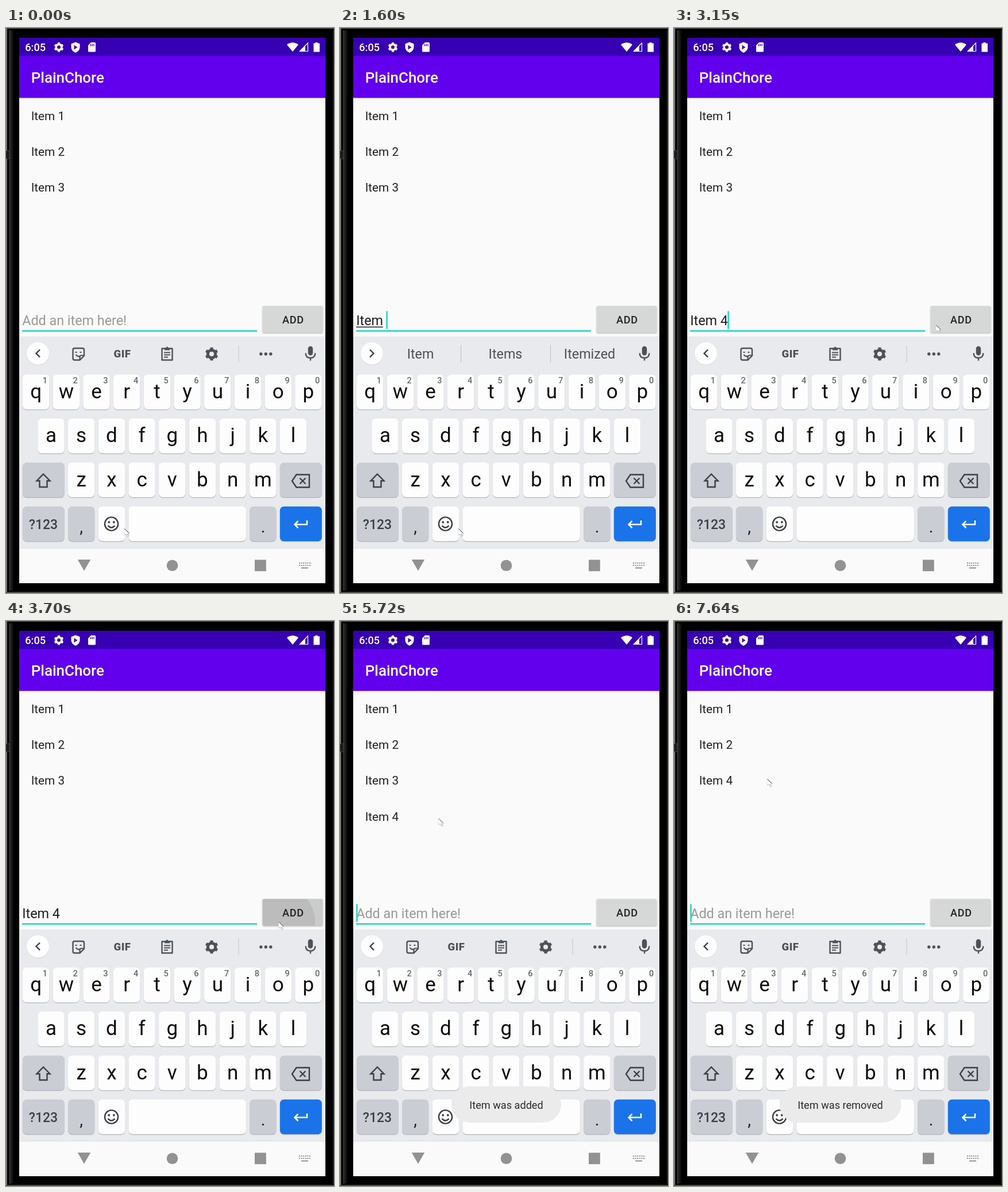
An HTML page that plays this animation: 571x981 px, repeating every 8000 ms.

```html
<!DOCTYPE html>
<html lang="en">
<head>
<meta charset="utf-8">
<title>To-do list</title>
<style>
html, body { margin: 0; width: 100%; height: 100%; overflow: hidden; background: #000; }
svg { display: block; width: 100vw; height: 100vh; font-family: Roboto, "Noto Sans", sans-serif; }
text { white-space: pre; }
.mid { text-anchor: middle; }
.line { fill: none; stroke: #3c4043; stroke-width: 2.4; }
.list { font-size: 20.74px; fill: #212121; }
.field { font-size: 23.33px; fill: #1f1f1f; }
.word { font-size: 23.3px; fill: #4d5055; text-anchor: middle; }
.key { font-size: 35px; fill: #0c0c0d; text-anchor: middle; }
.digit { font-size: 14.5px; font-weight: 500; fill: #63666b; text-anchor: middle; }
.toast { font-size: 18.15px; fill: #2b2b2b; text-anchor: middle; }

/* Hard switches on an 8 s loop */
.step { animation: 8s step-end infinite; }
#hint { animation-name: hint; }
#c1 { animation-name: c1; }
#c2 { animation-name: c2; }
#c3 { animation-name: c3; }
#c4 { animation-name: c4; }
#c5 { animation-name: c5; }
#compose { animation-name: compose; }
#caret { animation-name: caret; }
#tools { animation-name: tools; }
#words { animation-name: words; }
#w1 { animation-name: w1; }
#w2 { animation-name: w2; }
#w3 { animation-name: w3; }
#third { animation-name: third; }
#moved { animation-name: moved; }
#fourth { animation-name: fourth; }

@keyframes hint { 0% { opacity: 1 } 3.75% { opacity: 0 } 47.875%, 100% { opacity: 1 } }
@keyframes c1 { 0% { fill-opacity: 0 } 3.75% { fill-opacity: 1 } 47.875%, 100% { fill-opacity: 0 } }
@keyframes c2 { 0% { fill-opacity: 0 } 7.75% { fill-opacity: 1 } 47.875%, 100% { fill-opacity: 0 } }
@keyframes c3 { 0% { fill-opacity: 0 } 13.4% { fill-opacity: 1 } 47.875%, 100% { fill-opacity: 0 } }
@keyframes c4 { 0% { fill-opacity: 0 } 15.6% { fill-opacity: 1 } 47.875%, 100% { fill-opacity: 0 } }
@keyframes c5 { 0% { fill-opacity: 0 } 23.8% { fill-opacity: 1 } 47.875%, 100% { fill-opacity: 0 } }
@keyframes compose {
  0% { width: 0 } 3.75% { width: 6.4px } 7.75% { width: 14px } 13.4% { width: 26.3px }
  15.6% { width: 46.7px } 23.8%, 100% { width: 0 }
}
@keyframes caret {
  0% { opacity: 0; transform: none }
  1.6% { opacity: 1; transform: none }
  3.75% { opacity: 1; transform: translateX(6.4px) }
  7.75% { opacity: 1; transform: translateX(14px) }
  13.4% { opacity: 1; transform: translateX(26.3px) }
  15.6% { opacity: 1; transform: translateX(46.7px) }
  19.9% { opacity: 1; transform: translateX(52.2px) }
  23.8% { opacity: 1; transform: translateX(65.1px) }
  29.1% { opacity: 0; transform: translateX(65.1px) }
  35.2% { opacity: 1; transform: translateX(65.1px) }
  41.2% { opacity: 0; transform: none }
  47.875% { opacity: 1; transform: none }
  53.7% { opacity: 0; transform: none }
  57.9% { opacity: 1; transform: none }
  64.9% { opacity: 0; transform: none }
  71.2% { opacity: 1; transform: none }
  77.4% { opacity: 0; transform: none }
  83.5% { opacity: 1; transform: none }
  90.6% { opacity: 0; transform: none }
  95.3%, 100% { opacity: 1; transform: none }
}
@keyframes tools { 0% { opacity: 1 } 5.75% { opacity: 0 } 25.6%, 100% { opacity: 1 } }
@keyframes words { 0% { opacity: 0 } 5.75% { opacity: 1 } 25.6%, 100% { opacity: 0 } }
@keyframes w1 { 0% { opacity: 1 } 9.8%, 100% { opacity: 0 } }
@keyframes w2 { 0% { opacity: 0 } 9.8% { opacity: 1 } 17.8%, 100% { opacity: 0 } }
@keyframes w3 { 0% { opacity: 0 } 17.8%, 100% { opacity: 1 } }
@keyframes third { 0% { opacity: 1 } 92.25%, 100% { opacity: 0 } }
@keyframes moved { 0% { opacity: 0 } 92.25%, 100% { opacity: 1 } }
@keyframes fourth { 0% { opacity: 0 } 47.875% { opacity: 1 } 92.25%, 100% { opacity: 0 } }

/* Continuous motion */
#pointer { animation: move 8s linear infinite; }
@keyframes move {
  0%, 29% { transform: translate(206px, 869px) }
  33% { transform: translate(290px, 745px) }
  36% { transform: translate(408px, 540px) }
  37.6% { transform: translate(442px, 471px) }
  39.3% { transform: translate(455px, 515px) }
  41.2%, 42.6% { transform: translate(473px, 522px) }
  42.9%, 48.9% { transform: translate(474.5px, 522px) }
  52% { transform: translate(380px, 690px) }
  54.5% { transform: translate(255px, 890px) }
  56.3% { transform: translate(207px, 973px) }
  57.8%, 60.5% { transform: translate(207px, 990px) }
  61.5% { transform: translate(214px, 950px) }
  65% { transform: translate(205px, 760px) }
  69.5% { transform: translate(180px, 430px) }
  73% { transform: translate(165px, 278px) }
  76% { transform: translate(163px, 270px) }
  78.6%, 82% { transform: translate(163px, 272px) }
  83.5%, 100% { transform: translate(162px, 274px) }
}
#ripple { animation: ripple 8s linear infinite; }
#wave { transform-origin: 475px 522px; animation: wave 8s linear infinite; }
@keyframes ripple { 0%, 46.1% { opacity: 0 } 46.11%, 48.5% { opacity: 1 } 51.5%, 100% { opacity: 0 } }
@keyframes wave { 0%, 46.25% { transform: scale(.57) } 48%, 100% { transform: scale(1) } }
#added { animation: added 8s linear infinite; }
#removed { animation: removed 8s linear infinite; }
@keyframes added { 0%, 53% { opacity: 0 } 56.4%, 73.7% { opacity: 1 } 78.3%, 100% { opacity: 0 } }
@keyframes removed { 0%, 92.4% { opacity: 0 } 95.4%, 100% { opacity: 1 } }
</style>
</head>
<body>
<svg viewBox="0 0 571 981" preserveAspectRatio="none">
  <defs>
    <g id="gear" fill="none" stroke="currentColor">
      <circle r="5.8" stroke-width="4.5"/>
      <circle r="8.3" stroke-width="3.2" pathLength="6" stroke-dasharray=".5 .5" stroke-dashoffset=".75"/>
    </g>
    <clipPath id="button"><rect x="446.5" y="482.5" width="105" height="46.5" rx="2.6"/></clipPath>
    <filter id="soft" x="-10%" y="-20%" width="120%" height="150%">
      <feDropShadow dx="0" dy="1.2" stdDeviation="1.2" flood-opacity=".28"/>
    </filter>
    <linearGradient id="edge">
      <stop offset="0" stop-color="#333"/><stop offset=".5" stop-color="#1b1b1b"/><stop offset="1"/>
    </linearGradient>
  </defs>

  <!-- Device -->
  <path d="M0 0h571v981H0z"/>
  <path d="M0 0h571v1.2H0z" fill="#555"/>
  <path d="M0 0h2v981H0z" fill="#747474"/>
  <path d="M5 4h9v973H5z" fill="url(#edge)"/>
  <path d="M0 213h6v14H0z" fill="#1a1a1a" stroke="#555" stroke-width=".8"/>
  <path d="M569 4h2v973h-2z" fill="#222"/>
  <path d="M0 979h571v2H0z" fill="#4a4a4a"/>

  <!-- App -->
  <path d="M23 17h533v947H23z" fill="#fafafa"/>
  <path d="M23 17h533v32H23z" fill="#3700b3"/>
  <path d="M23 48.500h533v73H23z" fill="#6200ee"/>
  <g fill="#fff">
    <text x="33.300" y="40" font-size="18.150" font-weight="500">6:05</text>
    <use href="#gear" transform="translate(92 33.300) scale(.84)" color="#fff"/>
    <path d="M121 24.500l7.500 3v6q0 6-7.500 9.500-7.500-3.500-7.500-9.500v-6z"/>
    <path d="M118.500 29.500l6 4-6 4z" fill="#3700b3"/>
    <path d="M148 25h6.500q1.500 0 1.500 1.500v13.500q0 1.500-1.500 1.500h-10q-1.500 0-1.500-1.500v-10z"/>
    <path d="M147.500 28v3.500M150.300 28v3.500M153 28v3.500" stroke="#3700b3" stroke-width="1.4"/>
    <path d="M489 29q10-7.500 20 0l-10 12z"/>
    <path d="M521 30v10.500h-10.500z"/>
    <path d="M511.500 40.500l14-14.500v14.500z" fill="none" stroke="#fff" stroke-width="1.200"/>
    <path d="M538.500 25h4v1.500h3.500v15h-10.500v-15h3z"/>
    <text x="43.700" y="94.500" font-size="25.930" font-weight="500">PlainChore</text>
  </g>
  <g class="list">
    <text x="43.700" y="160">Item 1</text>
    <text x="43.700" y="222.200">Item 2</text>
    <text x="43.700" y="284.400" id="third" class="step">Item 3</text>
    <text x="43.700" y="284.400" id="moved" class="step">Item 4</text>
    <text x="43.700" y="346.600" id="fourth" class="step">Item 4</text>
  </g>

  <!-- Input row -->
  <text x="28.200" y="516" class="field step" id="hint" style="fill:#9a9a9a">Add an item here!</text>
  <text x="28.200" y="516" class="field"><tspan id="c1" class="step">I</tspan><tspan id="c2" class="step">t</tspan><tspan id="c3" class="step">e</tspan><tspan id="c4" class="step">m</tspan><tspan> </tspan><tspan id="c5" class="step">4</tspan></text>
  <rect id="compose" class="step" x="28.200" y="518.500" width="0" height="1.500" fill="#222"/>
  <rect id="caret" class="step" x="28.200" y="491.500" width="2.500" height="31" fill="#1dd3c3"/>
  <path d="M28 524.700h409v2.500H28z" fill="#1dd3c3"/>
  <rect x="446.500" y="482.500" width="105" height="46.500" rx="2.600" fill="#d6d7d7" filter="url(#soft)"/>
  <g id="ripple" clip-path="url(#button)">
    <path d="M446 482h106v48H446z" fill-opacity=".055"/>
    <circle id="wave" cx="475" cy="522" r="110" fill-opacity=".075"/>
  </g>
  <text x="481" y="512.800" font-size="18.150" font-weight="500" letter-spacing=".7" fill="#222">ADD</text>

  <!-- Keyboard -->
  <path d="M23 535.500h533v368H23z" fill="#e8eaed"/>
  <circle cx="55.500" cy="566" r="19.500" fill="#c9cbce"/>
  <circle cx="55.500" cy="565.300" r="19.500" fill="#fdfdfd"/>
  <g id="tools" class="step" color="#4e5257">
    <path class="line" d="M59 558.500l-6.500 6.500 6.500 6.500"/>
    <g fill="none" stroke="currentColor" stroke-width="2.400">
      <path d="M119.500 556h13.500q3 0 3 3v10l-7.500 7.500h-9q-3 0-3-3v-14.500q0-3 3-3z"/>
      <path d="M136 568.500h-4.500q-3 0-3 3v5M121.500 567q3 4.500 7.500 2.500M120.500 563h3M128.500 563h3" stroke-width="2.200"/>
      <path d="M271.500 556.500h18v20h-18z" stroke-linejoin="round"/>
      <path d="M275 563.500h11M275 567.500h11M275 571.500h7" stroke-width="2"/>
    </g>
    <path d="M276 555.500h2.300q2.200-4.500 4.400 0h2.300v4h-9z" fill="currentColor"/>
    <text class="mid" x="202.500" y="571.800" font-size="18.500" font-weight="900" letter-spacing=".6" fill="currentColor">GIF</text>
    <use href="#gear" transform="translate(358 566) scale(1.150)"/>
    <path d="M404.500 551h1v29h-1z" fill="#c3c6ca"/>
    <g fill="currentColor">
      <circle cx="443.800" cy="566" r="2.700"/><circle cx="452.300" cy="566" r="2.700"/><circle cx="460.800" cy="566" r="2.700"/>
    </g>
  </g>
  <g id="words" class="step">
    <path class="line" d="M52 558.500l6.500 6.500-6.500 6.500"/>
    <path d="M210 550h1v31h-1zM366 550h1v31h-1z" fill="#bcbfc4"/>
  </g>
  <rect x="525.800" y="552.500" width="8.400" height="16" rx="4.200" fill="#4e5257"/>
  <path d="M521.700 564.500q0 8.300 8.300 8.300t8.300-8.300M530 572.500v5" fill="none" stroke="#4e5257" stroke-width="2.400"/>
  <g id="keys"></g>
  <path class="line" d="M65 774.500l11.500 11.700h-5v10.800h-13v-10.800h-5z"/>
  <path class="line" d="M505.500 775.500h22.500v22h-22.500l-7.500-11zM511.500 781.500l10 10M521.500 781.500l-10 10"/>
  <text class="mid" x="65" y="869.500" font-size="23" font-weight="500" fill="#3c4043">?123</text>
  <text class="mid" x="131" y="876" font-size="29" fill="#202124">,</text>
  <text class="mid" x="447.500" y="876" font-size="29" fill="#202124">.</text>
  <circle class="line" cx="183.500" cy="861" r="11.600"/>
  <path class="line" d="M177.300 864.200q6.200 6.500 12.400 0"/>
  <circle cx="179.200" cy="858" r="1.900" fill="#3c4043"/><circle cx="187.800" cy="858" r="1.900" fill="#3c4043"/>
  <path d="M524 855v7h-21M508.500 856l-6 6 6 6" fill="none" stroke="#fff" stroke-width="2.500"/>

  <!-- Navigation -->
  <path d="M23 903.500h533v60.500H23z" fill="#fafafa"/>
  <path d="M23 903h533v1H23z" fill="#e2e3e5"/>
  <g fill="#929292">
    <path d="M124.800 923h22.400l-11.200 19.500z"/>
    <circle cx="289.500" cy="933.300" r="9.800"/>
    <path d="M433 923.300h19.800v19.800h-19.800z"/>
    <path d="M510 929h20M510 933h20" stroke="#929292" stroke-width="2" stroke-dasharray="2 1.600"/>
    <path d="M514 936.500h12v2h-12z"/>
  </g>

  <g id="added">
    <rect x="194" y="808" width="191" height="63" rx="31.500" fill="#ebebec"/>
    <text class="toast" x="289.500" y="846.500">Item was added</text>
  </g>
  <g id="removed">
    <rect x="183.500" y="808" width="212" height="63" rx="31.500" fill="#ebebec"/>
    <text class="toast" x="289.500" y="846.500">Item was removed</text>
  </g>

  <g id="pointer">
    <path d="M0 0v12l3-2.500 2.500 5 2-1-2.500-4.500h4z" fill="#fff" stroke="#777" stroke-opacity=".3" stroke-width=".6"/>
    <path d="M.5 .5l8 8" stroke="#333" fill="none"/>
    <path d="M1 10.500l2-1.500M4 10l2 4M6 9.500l2 3.500" stroke="#777" fill="none" stroke-width=".8" stroke-dasharray="1.500 1"/>
  </g>
</svg>
<script>
const NS = "http://www.w3.org/2000/svg";
const keys = document.getElementById("keys");
const words = document.getElementById("words");
const PITCH = 52.7, ROW = 76.3, LEFT = 28.9, TOP = 601.8, W = 46.4, H = 60.4;

function add(parent, tag, attrs, label) {
  const el = document.createElementNS(NS, tag);
  for (const k in attrs) el.setAttribute(k, attrs[k]);
  if (label) el.textContent = label;
  return parent.appendChild(el);
}

function key(col, row, width = W, fill = "#fdfdfd") {
  const x = LEFT + col * PITCH, y = TOP + row * ROW;
  const box = { x, width, height: H, rx: 7 };
  add(keys, "rect", { ...box, y: y + 1.2, fill: "#b3b5b9" });
  add(keys, "rect", { ...box, y, fill });
  return [x, y];
}

[["qwertyuiop", 0], ["asdfghjkl", .5], ["zxcvbnm", 1.5]].forEach(([row, start], r) => {
  [...row].forEach((ch, i) => {
    const [x, y] = key(start + i, r);
    add(keys, "text", { class: "key", x: x + W / 2, y: y + 41.2 }, ch);
    if (r === 0) add(keys, "text", { class: "digit", x: x + 39, y: y + 15.2 }, String((i + 1) % 10));
  });
});

const GREY = "#cacdd4", WIDE = 73;
key(0, 2, WIDE, GREY);
key(8.5, 2, WIDE, GREY);
key(0, 3, WIDE, GREY);
key(1.5, 3, W, GREY);
key(2.5, 3);
key(3.5, 3, 204.5);
key(7.5, 3, W, GREY);
key(8.5, 3, WIDE, "#1a73e8");

[["I", "I'm", "It"], ["It", "Its", "It's"], ["Item", "Items", "Itemized"]].forEach((set, i) => {
  const g = add(words, "g", { id: "w" + (i + 1), class: "step" });
  set.forEach((w, j) => add(g, "text", { class: "word", x: [140, 288, 434.5][j], y: 574 }, w));
});
</script>
</body>
</html>
```
